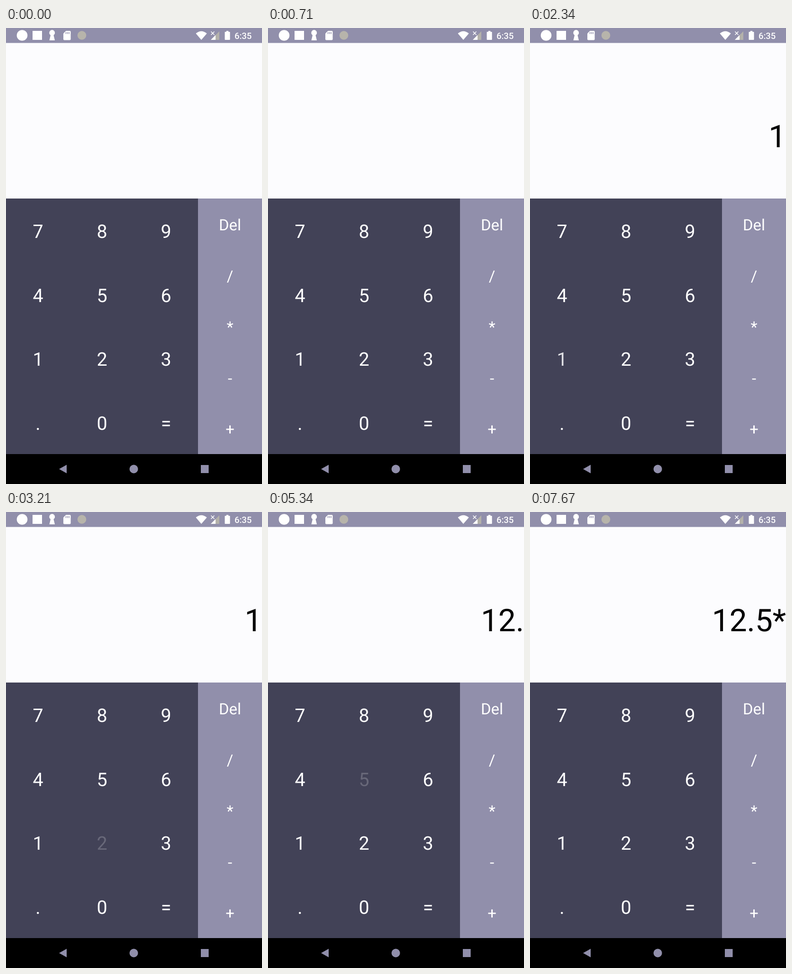
These frames come from a looping animation (540 px wide and 960 px high, 8 s). An HTML page:

```html
<!DOCTYPE html>
<html lang="en">
<head>
<meta charset="utf-8">
<title>Calculator</title>
<style>
  html, body { margin: 0; width: 100%; height: 100%; overflow: hidden; background: #000; }
  svg { display: block; width: 540px; height: 960px; font-family: Roboto, sans-serif; text-rendering: geometricPrecision; }
  #keys { fill: #fff; text-anchor: middle; }
  .digit { font-size: 39.4px; }
  .operator { font-size: 32.8px; }
  #display { font-size: 65.6px; text-anchor: end; }
  #clock { font-size: 18.4px; font-weight: 500; }
</style>
</head>
<body>
<svg viewBox="0 0 540 960">
  <rect width="540" height="960" fill="#fcfcfe"/>
  <rect width="540" height="31.5" fill="#918fab"/>
  <rect y="359" width="405" height="538" fill="#424257"/>
  <rect x="405" y="359" width="135" height="538" fill="#918fab"/>
  <rect y="897" width="540" height="63"/>

  <!-- Status bar -->
  <g fill="#fff">
    <circle cx="34" cy="15.5" r="11.3"/>
    <rect x="56" y="6" width="20" height="19"/>
    <path d="M94 15.2a6 6 0 1 1 6.4 0L103 26H91.5Z"/>
    <path d="M126.5 6H134.5a2 2 0 0 1 2 2V23.5a2 2 0 0 1-2 2H123a2 2 0 0 1-2-2V11.5Z"/>
    <path d="M126.5 8.5v4M129.7 8.5v4M133 8.5v4" stroke="#918fab" stroke-width="1.5"/>
    <circle cx="160" cy="15.5" r="9.3" fill="#b7b4ab"/>
    <path d="M400.5 11.5Q412 2 423.7 11.5L412 25Z"/>
    <path d="M450 7V25H432Z" fill="#b3b1aa"/>
    <path d="M442 15V25H432Z"/>
    <path d="M432.5 7.5l7 7m0-7l-7 7" stroke="#fff" stroke-width="1.5"/>
    <path d="M464.8 6h4.4v2h2.3q1 0 1 1V24q0 1-1 1h-9q-1 0-1-1V9q0-1 1-1h2.3Z"/>
    <text id="clock" x="482" y="23">6:35</text>
  </g>

  <!-- Navigation bar -->
  <g fill="#918fab">
    <path d="M112 928.5L128 919.5V937.5Z"/>
    <circle cx="269.5" cy="928.5" r="9"/>
    <rect x="411" y="920" width="16.5" height="17"/>
  </g>

  <g id="keys"></g>
  <text id="display" x="540" y="251"></text>
</svg>
<script>
const LOOP = 8000, FADE = 250, TEXT_DELAY = 40, PRESSED_OPACITY = 0.2;
const presses = [
  { key: '1', down: 2170, up: 2170 },
  { key: '2', down: 3170, up: 3290 },
  { key: '.', down: 4290, up: 4290 },
  { key: '5', down: 5340, up: 5340 },
  { key: '*', down: 6420, up: 6590 },
];

const keyNodes = {};
const display = document.getElementById('display');

function addKey(label, x, y, type) {
  const node = document.createElementNS('http://www.w3.org/2000/svg', 'text');
  node.setAttribute('x', x);
  node.setAttribute('y', Math.round(y));
  node.setAttribute('class', type);
  node.textContent = label;
  document.getElementById('keys').append(node);
  keyNodes[label] = node;
}

[...'789456123.0='].forEach((label, i) =>
  addKey(label, 67.5 + 135 * (i % 3), 442 + 134.5 * Math.floor(i / 3), 'digit'));
['Del', '/', '*', '-', '+'].forEach((label, i) =>
  addKey(label, 472.5, 426 + 107.6 * i, 'operator'));

const easeInOut = p => p < 0.5 ? 2 * p * p : 1 - 2 * (1 - p) ** 2;

function keyOpacity(t, { down, up }) {
  if (t < down) return 1;
  const progress = Math.min(1, Math.max(0, (t - up) / FADE));
  return PRESSED_OPACITY + (1 - PRESSED_OPACITY) * easeInOut(progress);
}

function render() {
  const t = performance.now() % LOOP;
  for (const press of presses) {
    keyNodes[press.key].setAttribute('opacity', keyOpacity(t, press));
  }
  display.textContent = presses
    .filter(press => t >= press.up + TEXT_DELAY)
    .map(press => press.key)
    .join('');
  requestAnimationFrame(render);
}
render();
</script>
</body>
</html>
```
